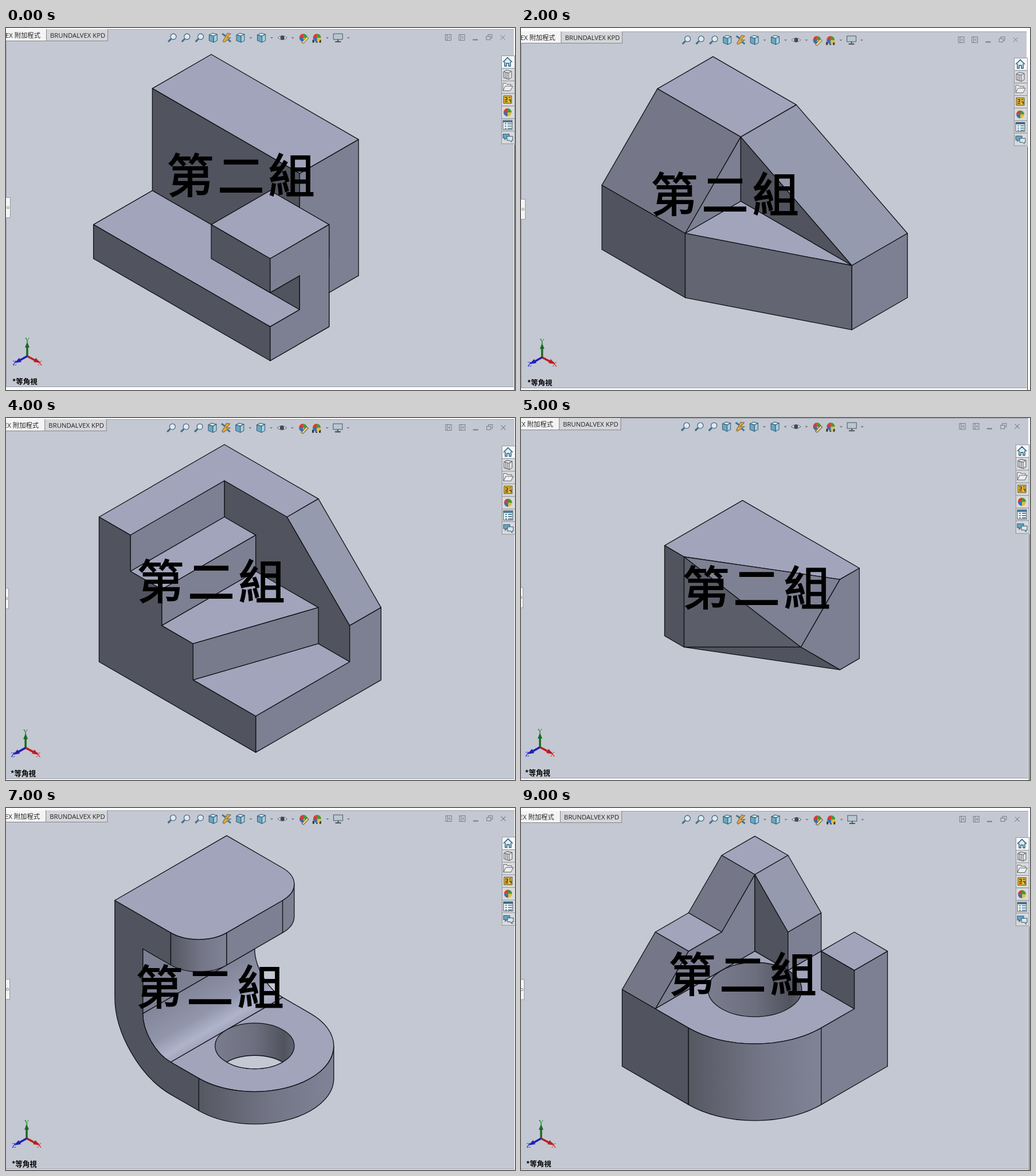
Write an HTML page that moves like this. It is 888 px wide and 631 px high and loops after 10 s.

```html
<!DOCTYPE html>
<html lang="zh-Hant">
<head>
<meta charset="utf-8">
<title>等角視</title>
<style>
html, body { margin: 0; width: 100%; height: 100%; overflow: hidden; background: #fff; }
svg { display: block; width: 100%; height: 100%; }
.slide { display: none; }
.solid path { stroke: #101114; stroke-width: 1.3; stroke-linejoin: round; vector-effect: non-scaling-stroke; }
.title { font: 400 81px "Noto Sans CJK TC", "Noto Sans CJK", sans-serif; letter-spacing: 7.4px; stroke: #000; stroke-width: 2; }
.tab { font: 11.3px "Open Sans", "Noto Sans CJK TC", "Noto Sans CJK", sans-serif; fill: #222; }
.view { font: 700 12.5px "Noto Sans CJK TC", "Noto Sans CJK", sans-serif; }
.axis { font: 12px "Liberation Serif", serif; text-anchor: middle; }
</style>
</head>
<body>
<svg id="stage" viewBox="0 0 888 631" preserveAspectRatio="none">
  <defs>
    <linearGradient id="outer"><stop stop-color="#555762"/><stop offset=".55" stop-color="#747687"/><stop offset="1" stop-color="#808396"/></linearGradient>
    <linearGradient id="bore"><stop stop-color="#7b7d8f"/><stop offset=".5" stop-color="#6d6f7f"/><stop offset=".87" stop-color="#51535e"/><stop offset="1" stop-color="#60626f"/></linearGradient>
    <linearGradient id="fillet" gradientUnits="userSpaceOnUse" x1="-3" y1="11" x2="-1" y2="13">
      <stop stop-color="#828598"/><stop offset=".55" stop-color="#9296ac"/><stop offset=".85" stop-color="#b0b4cb"/><stop offset="1" stop-color="#a1a4bb"/>
    </linearGradient>
    <g id="lens">
      <path d="M-2 2L-7 7" stroke="#3d6f8e" stroke-width="3"/>
      <circle cx="2" cy="-2" r="5" fill="#dceaf3" stroke="#516a7b" stroke-width="1.3"/>
    </g>
    <g id="cube" stroke="#34586c" stroke-linejoin="round">
      <path d="M-7 -5L-1 -8 7 -6 1 -3Z" fill="#d9eef6"/>
      <path d="M-7 -5L1 -3V8L-7 5Z" fill="#69a8c3"/>
      <path d="M1 -3L7 -6V5L1 8Z" fill="#a7cfe0"/>
    </g>
    <g id="bolt">
      <path d="M-7 6L1 -8 7 -7 0 0H7L-5 8Z" fill="#e4a83c" stroke="#6e643f"/>
      <path d="M-8 -7L-2 -3M2 3L7 7" stroke="#3c7896" stroke-width="3"/>
    </g>
    <g id="eye">
      <path d="M-8 0Q0 -7 8 0Q0 7 -8 0Z" fill="#edf0f2" stroke="#60656d"/>
      <circle r="3.7" fill="#414b56"/>
    </g>
    <g id="ball">
      <circle r="7" fill="#e4bd35"/>
      <path d="M0 0V-7A7 7 0 0 1 7 0Z" fill="#3f9a45"/>
      <path d="M0 0V-7A7 7 0 0 0 -7 0Z" fill="#d93b35"/>
      <path d="M0 0H-7A7 7 0 0 0 0 7Z" fill="#376fb5"/>
    </g>
    <g id="pencil"><path d="M-3 8L6 -2 9 1 0 10Z" fill="#e8d08a" stroke="#665b42"/></g>
    <g id="checker"><path d="M-8 6H8" stroke="#333" stroke-width="5" stroke-dasharray="3"/></g>
    <g id="monitor" stroke="#4e555e">
      <path d="M-8 -7H8V3H-8Z" fill="#b8c7d3"/>
      <path d="M0 3V7M-5 7H5" stroke-width="2"/>
    </g>
    <path id="drop" d="M-2.5 -1H2.5L0 2Z" fill="#7c8189"/>
    <g id="pane" fill="none" stroke="#777c85"><path d="M-5 -5H5V5H-5ZM-2 -5V5M3 -2L0 0 3 2"/></g>
    <g id="minimise"><path d="M-5 4H4" stroke="#777c85" stroke-width="2"/></g>
    <g id="restore" fill="none" stroke="#777c85"><path d="M-5 -2H2V4H-5ZM-2 -2V-5H5V1H2"/></g>
    <g id="close" stroke="#777c85"><path d="M-4 -4L4 4M4 -4L-4 4"/></g>
    <g id="home"><path d="M-8 0L0 -8 8 0M-5 -1V7H-2V2H2V7H5V-1" fill="#dceaf0" stroke="#245e7b" stroke-width="1.5"/></g>
    <g id="library"><path d="M-7 -5L-2 -8 7 -6V5L2 8 -7 5ZL2 -3V8M2 -3L7 -6M-4 -4V6M-1 -4V7" fill="#e4e5e6" stroke="#555b62"/></g>
    <g id="folder"><path d="M-8 6V-7H-3L-1 -5H6V-2M-8 6L-4 -2H9L5 6Z" fill="#eceef0" stroke="#62676d"/></g>
    <g id="palette">
      <path d="M-7 -7H7V6H-7Z" fill="#e8bd3c" stroke="#55491f"/>
      <path d="M-5 -4H-1V0H-5M2 -4H5M-5 3H0M2 0H5V4" fill="none" stroke="#554515" stroke-width="1.6"/>
    </g>
    <g id="list">
      <path d="M-8 -8H8V8H-8Z" fill="#f2f5f7" stroke="#3f5966"/>
      <path d="M-8 -6H8" stroke="#376f8c" stroke-width="3"/>
      <path d="M-5 -2H-2M-5 2H-2M-5 6H-2M0 -2H7M0 2H7M0 6H7" stroke="#47748a" stroke-width="1.6"/>
    </g>
    <g id="chat" stroke="#31576c">
      <path d="M-8 -6H3V1H-2L-5 4V1H-8Z" fill="#64a6c4"/>
      <path d="M-1 -2H9V5H7V8L4 5H-1Z" fill="#d5e6ee"/>
    </g>
    <g id="tabs">
      <path d="M-9 2H70V22H-9Z" fill="#f4f4f5"/>
      <path d="M70 2H177V22H70Z" fill="#d5d6d9"/>
      <path d="M-9 22.5H177.5V2M70.5 2V22" fill="none" stroke="#85878c"/>
      <text class="tab" x="-1" y="17">EX 附加程式</text>
      <text class="tab" x="77" y="17">BRUNDALVEX KPD</text>
    </g>
    <g id="triad">
      <path d="M37 572V553" stroke="#176b22" stroke-width="3.500"/><path d="M37 547L41 557H33Z" fill="#176b22"/>
      <path d="M37 572L54 581" stroke="#b81f20" stroke-width="3.500"/><path d="M60 584L48 582 52 575Z" fill="#b81f20"/>
      <path d="M37 572L21 581" stroke="#2020b5" stroke-width="3.500"/><path d="M15 584L23 575 27 582Z" fill="#2020b5"/>
      <g class="axis">
        <text x="37" y="548" fill="#178225">Y</text><text x="59" y="588" fill="#e02020">X</text><text x="15" y="588" fill="#2020e0">Z</text>
      </g>
      <text class="view" x="11" y="621">*等角視</text>
    </g>
    <g id="handle">
      <path d="M-9 295.500H7.500V330.500H-9Z" fill="#f5f5f6" stroke="#96999f"/>
      <circle cx="3.500" cy="313" r="2" fill="none" stroke="#888"/>
    </g>
  </defs>
</svg>
<script>
const BG = '#c4c8d2';
const use = (id, x = 0, y = 0) => `<use href="#${id}" x="${x}" y="${y}"/>`;

// Window furniture: evenly spaced icons; "+" marks a tool with a drop-down.
function toolbar() {
  let x = 290;
  return 'lens lens lens cube bolt cube+ cube+ eye+ ball,pencil checker,ball+ monitor+'.split(' ').map(tool => {
    const icons = tool.replace('+', '').split(',').map(id => use(id, x, 17)).join('');
    const menu = tool.endsWith('+');
    const drop = menu ? use('drop', x + 18, 17) : '';
    x += menu ? 36.6 : 23.8;
    return icons + drop;
  }).join('');
}

const windowButtons = ['pane', 'pane', 'minimise', 'restore', 'close']
  .map((id, i) => use(id, 771.5 + 23.8 * i, 16.5)).join('');

const sidebar = ['home', 'library', 'folder', 'palette', 'ball', 'list', 'chat'].map((id, i) => {
  const y = 48.5 + 21.9 * i;
  return `<path d="M864.500 ${y}h23v21.900h-23Z" fill="${i ? '#d9dadd' : '#f7f7f8'}" stroke="#92959b"/>` + use(id, 875, y + 11);
}).join('');

const furniture = `<path d="M0 3H886V626H0Z" fill="${BG}"/>
  <path d="M0 2.500H886M.5 3V626M0 625.500H886" fill="none" stroke="#9a9ea6"/>
  <path d="M887.500 203V640" stroke="#222"/>`
  + use('tabs') + toolbar() + windowButtons + sidebar + use('handle') + use('triad');

// Solids live on an isometric lattice: a unit step right is (1, 1), left (-1, 1), down (0, 2).
// Circles on a top face stay circles there.
const shade = fill => d => `<path fill="${fill}" d="M${d}Z"/>`;
const upper = shade('#a1a4bb'), left = shade('#51535e'), right = shade('#7d8092');
const outer = shade('url(#outer)'), bore = shade('url(#bore)');

const quad = (paint, x, y, [ux, uy], [vx, vy]) => paint(`${x} ${y}l${ux} ${uy} ${vx} ${vy} ${-ux} ${-uy}`);
const roof = (x, y, r, l) => quad(upper, x, y, [r, r], [-l, l]);
const leftWall = (x, y, r, d) => quad(left, x, y, [r, r], [0, 2 * d]);
const rightWall = (x, y, l, d) => quad(right, x, y, [l, -l], [0, 2 * d]);
const leftRamp = (x, y, r, l, d) => quad(shade('#757788'), x, y, [r, r], [-l, l + 2 * d]);
const rightRamp = (x, y, l, r, d) => quad(shade('#959aae'), x, y, [l, -l], [r, r + 2 * d]);
const block = (x, y, r, l, d) =>
  roof(x, y, r, l) + leftWall(x - l, y + l, r, d) + rightWall(x - l + r, y + l + r, l, d);

const SMALL = Math.SQRT2, LARGE = 2 * SMALL;
const arc = (radius, sweep, end) => `A${radius} ${radius} 0 0 ${sweep} ${end} `;
const disc = (x, y, r) => `${x - r} ${y}` + arc(r, 1, `${x + r} ${y}`) + arc(r, 1, `${x - r} ${y}`);

const hookBlock = () => block(0, 0, 5, 2, 4) + block(-2, 8, 6, 2, 1) + leftWall(1, 11, 2, 1)
  + block(2, 8, 2, 2, 1) + right('2 12 4 10 4 16 2 18 2 16 3 15 3 13 2 14');

const notchedWedge = () => roof(0, 0, 3, 2) + leftRamp(-2, 2, 3, 2, 2) + leftWall(-4, 8, 3, 2)
  + right('1 5 1 9 -1 11') + left('1 5 5 13 1 9') + upper('1 9 5 13 -1 11')
  + rightRamp(1, 5, 2, 4, 2) + shade('#636573')('-1 11 5 13 5 17 -1 15') + rightWall(5, 13, 2, 2);

function stairs() {
  const front = ['-3 5', '-2 8', '-1 11', '1 15'], back = ['0 2', '1 5', '3 9', '4 12'];
  let steps = '', outline = '-4 4';
  for (let i = 0; i < 3; i++) {
    const riser = shade(i < 2 ? '#7d8092' : '#777b8b');
    steps += riser(`${front[i]}L${back[i]}v2L${front[i]}v2L${front[i]}`.replace(/v2L.*/, `v2L${front[i]}m0 0`).replace('m0 0', 'v2'))
      .replace(/d="[^"]*"/, `d="M${front[i]}v2L${back[i]}m0 2L${front[i]}"`)
      .replace(/d="[^"]*"/, `d="${riserPath(front[i], back[i])}"`);
    steps += upper(`${lower(front[i])} ${lower(back[i])} ${back[i + 1]} ${front[i + 1]}`);
    outline += ` ${front[i]} ${lower(front[i])}`;
  }
  return roof(0, 0, 3, 4) + left('0 2 2 4 4 10 4 12 0 8') + rightRamp(2, 4, 1, 2, 2) + steps
    + right('1 15 4 12 4 10 5 9 5 13 1 17') + left(outline + ' 1 15 1 17 -4 12');
}
function lower(point) {
  const [x, y] = point.split(' ').map(Number);
  return `${x} ${y + 2}`;
}
function riserPath(a, b) { return `M${a} ${b} ${lower(b)} ${lower(a)}Z`; }

const cutPrism = () => upper('-4 4 0 0 6 6 5 7 -3 5') + leftWall(-4, 4, 1, 4)
  + shade('#5b5e69')('-3 5 3 13 -3 13') + shade('#7e8193')('-3 5 5 7 3 13')
  + right('5 7 6 6 6 14 5 15 3 13') + left('-3 13 3 13 5 15');

const slottedBlock = () => roof(0, 0, 5, 1) + leftWall(-1, 1, 4, 1) + roof(-2, 2, 3, 1) + upper('1 5 3 7 1 7')
  + shade('#6f7181')('-1 5H1V7H3V5H5V11H4V10H0V11H-1')
  + left('-3 3 -1 5 -1 11 0 12 0 10 2 12 2 16 -3 11')
  + upper('0 10H4L2 12') + upper('-1 11H0V12') + upper('4 11H5L4 12')
  + right('2 12 4 10 4 12 5 11 5 13 2 16');

const bracket = () => rightWall(-3, 7, 4, 2)
  + shade('url(#fillet)')('-3 11 1 7C1 8.1 1.45 9.45 2 10L-2 14C-2.55 13.45 -3 12.1 -3 11')
  + upper('-2 14 2 10 3 11' + arc(LARGE, 1, '-1 15'))
  + outer('-1 15' + arc(LARGE, 0, `${1 + LARGE} 13`) + 'v2' + arc(LARGE, 1, '-1 17'))
  + bore(disc(1, 13, SMALL))
  + shade(BG)('0 14' + arc(SMALL, 1, '2 14') + arc(SMALL, 1, '0 14'))
  + left('-4 4 -2 6V8L-3 7V11C-3 12.1 -2.55 13.45 -2 14L-1 15V17L-2 16C-3.1 14.9 -4 12.2 -4 10')
  + outer('-2 6' + arc(SMALL, 0, '0 6') + 'v2' + arc(SMALL, 1, '-2 8'))
  + rightWall(0, 6, 2, 1)
  + right('2 4' + arc(SMALL, 0, `${1 + SMALL} 3`) + 'v2' + arc(SMALL, 1, '2 6'))
  + upper('-4 4 0 0 2 2' + arc(SMALL, 1, '2 4') + 'L0 6' + arc(SMALL, 1, '-2 6'));

const boredBase = () => right('0 2 0 6 -3 9 -2 6 -1 5') + left('0 2 1 5 1 7 0 6') + rightWall(1, 5, 1, 1)
  + upper('-3 9 0 6 1 7 2 6 2 8 3 9 2 10' + arc(LARGE, 1, '-2 10'))
  + bore(disc(0, 8, SMALL))
  + roof(0, 0, 1, 1) + leftRamp(-1, 1, 1, 1, 1) + rightRamp(0, 2, 1, 1, 1)
  + roof(-2, 4, 1, 1) + leftRamp(-3, 5, 1, 1, 1) + leftWall(-4, 8, 2, 2)
  + outer('-2 10' + arc(LARGE, 0, '2 10') + 'v4' + arc(LARGE, 1, '-2 14'))
  + roof(3, 5, 1, 1) + leftWall(2, 6, 1, 1) + right('3 7 4 6 4 12 2 14 2 10 3 9');

// size is the bounding box [right, left, down]; inset moves the window edges [left, top, right, bottom].
const slides = [
  { solid: hookBlock, size: [6, 4, 4], inset: [0, 0, 0, 0], title: [281, 287] },
  { solid: notchedWedge, size: [7, 4, 4], inset: [0, 4, -4, 2], title: [227, 320] },
  { solid: stairs, size: [5, 4, 4], inset: [-3, 0, 1, 3], title: [229, 315] },
  { solid: cutPrism, size: [6, 4, 4], inset: [-4, -2, -1, 2], title: [282, 326], zoom: 0.659, center: [423, 320.6] },
  { solid: slottedBlock, size: [5, 3, 4], inset: [1, 1, -1, 0], title: [217, 314] },
  { solid: bracket, size: [5, 4, 5], inset: [-1, 2, 1, 4], title: [227, 342] },
  { solid: boredBase, size: [4, 4, 4], inset: [-2, 3, -1, 4], title: [258, 320] }
];
const order = [0, 0, 1, 1, 2, 3, 4, 5, 5, 6];

// Every solid is zoomed so that its bounding box fills the same height of the window.
function drawSlide({ solid, size: [r, l, d], inset, title, zoom = 1, center = [409.5, 313] }) {
  const [x0, y0, x1, y1] = inset;
  const stepY = 534 * zoom / (r + l + 2 * d), stepX = stepY * Math.sqrt(3);
  const apex = [center[0] - stepX * (r - l) / 2, center[1] - 267 * zoom];
  return `<g class="slide">
    <path d="M0 0H888V631H0Z" fill="#fff"/>
    <g transform="translate(${x0} ${y0}) scale(${1 + (x1 - x0) / 886} ${1 + (y1 - y0) / 600})">
      ${furniture}
      <g class="solid" transform="translate(${apex}) scale(${stepX} ${stepY})">${solid()}</g>
    </g>
    <text class="title" x="${title[0]}" y="${title[1]}">第二組</text>
  </g>`;
}

const stage = document.getElementById('stage');
stage.insertAdjacentHTML('beforeend', slides.map(drawSlide).join(''));
const views = stage.querySelectorAll('.slide');
const start = performance.now();

function tick() {
  const elapsed = performance.now() - start;
  const current = order[Math.floor(elapsed / 1000) % order.length];
  views.forEach((view, i) => { view.style.display = i === current ? 'inline' : 'none'; });
  requestAnimationFrame(tick);
}
tick();
</script>
</body>
</html>
```
